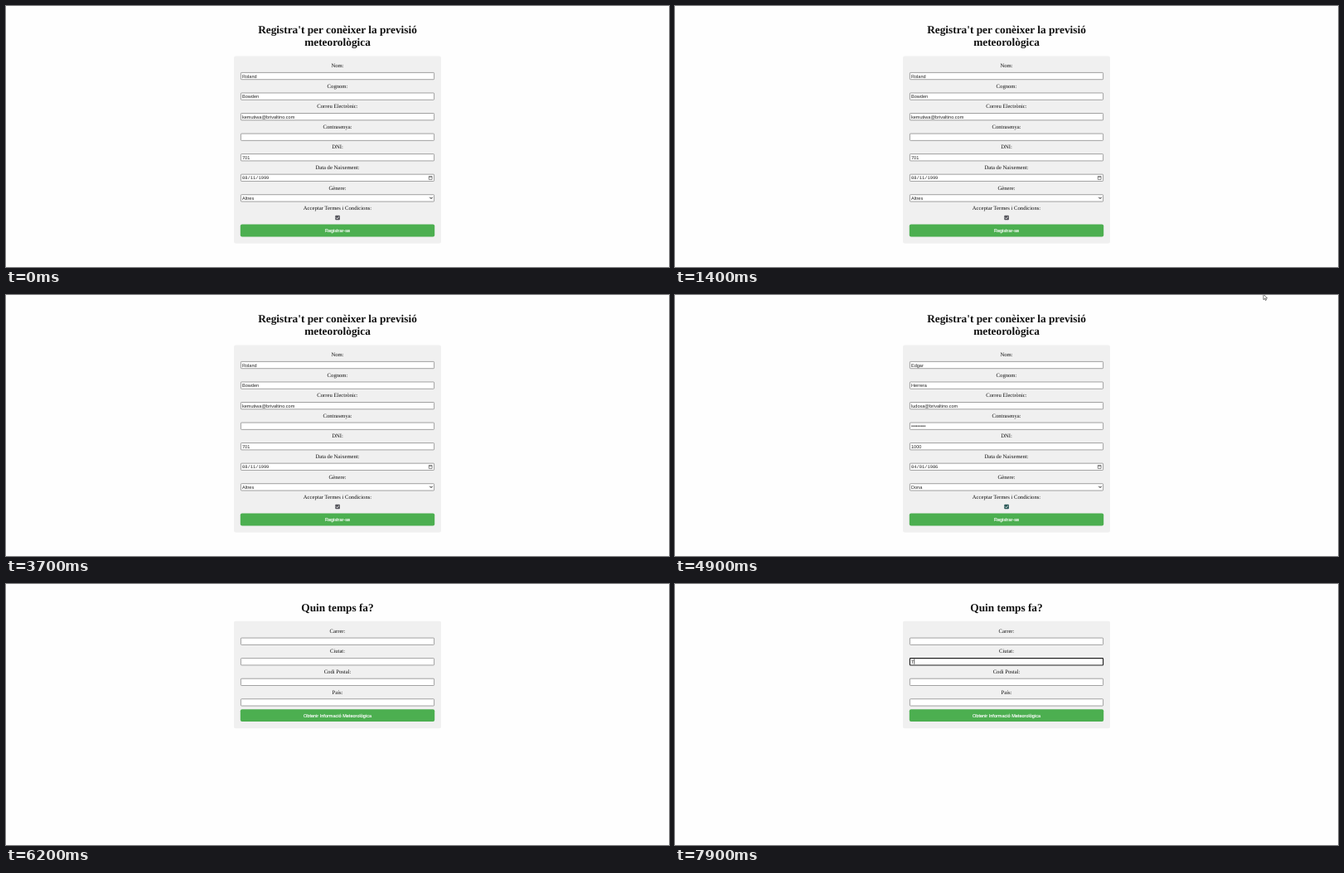
Animation of 800 by 315 pixels, one loop 8 s. Source, as an HTML page:

```html
<!DOCTYPE html>
<html lang="ca">
<head>
<meta charset="utf-8">
<style>
  html, body { margin: 0; width: 100%; height: 100%; overflow: hidden; background: #fefefe; }
  svg { display: block; width: 800px; height: 315px; }
  text { white-space: pre; text-rendering: geometricPrecision; fill: #111; }
  .title { font: bold 13.33px "Liberation Serif", "Times New Roman", serif; text-anchor: middle; }
  .label { font: 6.67px "Liberation Serif", "Times New Roman", serif; text-anchor: middle; }
  .value { font: 5.56px "Liberation Sans", Arial, sans-serif; fill: #222; }
  .date { font-family: "Liberation Mono", monospace; font-size: 5.4px; }
  .submit { fill: #fff; stroke: #fff; stroke-width: .15; text-anchor: middle; }
  .panel { fill: #f0f0f0; }
  .button { fill: #4caf50; }
  .field { fill: #fff; stroke: #858585; stroke-width: .75; }
  .focus { stroke: #222; stroke-width: 1.15; }
  .icon { fill: none; stroke: #333; stroke-width: .55; }
  .chevron { stroke: #111; stroke-width: 1; }
  .pointer { fill: #fff; stroke: #222; stroke-width: .6; stroke-linejoin: round; }
</style>
</head>
<body>
<svg id="stage" viewBox="0 0 800 315"></svg>
<script>
const LOOP = 8000, STEP = 100, PITCH = 24.55;
const FILL_AT = 3900, SUBMIT_AT = 6100;

const text = (cls, x, y, str, id = "") =>
  `<text class="${cls}" x="${x}" y="${y}" id="${id}">${str}</text>`;
const box = (cls, x, y, w, h, r, id = "") =>
  `<rect class="${cls}" x="${x}" y="${y}" width="${w}" height="${h}" rx="${r}" id="${id}"/>`;
const panel = (y, h) => box("panel", 275, y, 250, h, 2);
const button = (y, str) =>
  box("button", 282.8, y, 234.4, 14.8, 2) + text("value submit", 400, y + 9.4, str);

// A centred label with its input below
function row(y, label, id, cls = "") {
  return text("label", 400, y + 2.2, label) +
    box("field", 283.4, y + 8.4, 233.2, 8.3, .8, id + "Box") +
    text("value " + cls, 285, y + 14.6, "", id);
}

function registerPage() {
  const labels = ["Nom:", "Cognom:", "Correu Electrònic:", "Contrasenya:", "DNI:", "Data de Naixement:", "Gènere:"];
  const rows = labels.map((label, i) => row(72 + i * PITCH, label, "reg" + i, i === 5 ? "date" : ""));
  return text("title", 400, 33.1, "Registra't per conèixer la previsió") +
    text("title", 400, 48.4, "meteorològica") +
    panel(60.5, 226) + rows.join("") +
    `<path class="icon" d="M510.3 205.6h3.8v3.8h-3.8zM510.3 206.3h3.8"/>
     <path class="icon chevron" d="M511.3 230.8l1.7 1.7 1.7-1.7"/>` +
    text("label", 400, 246, "Acceptar Termes i Condicions:") +
    box("", 397.3, 252.7, 5.6, 5.6, .8, "check") +
    `<path d="M398.5 255.6l1.2 1.3 2-2.6" fill="none" stroke="#fff" stroke-width=".8"/>` +
    button(263.6, "Registrar-se");
}

function weatherPage() {
  const rows = ["Carrer:", "Ciutat:", "Codi Postal:", "País:"]
    .map((label, i) => row(56.7 + i * PITCH, label, "geo" + i));
  return text("title", 400, 33.1, "Quin temps fa?") +
    panel(44.8, 129.5) + rows.join("") +
    `<path id="caret" stroke="#000" stroke-width=".6"/>` +
    button(151.3, "Obtenir Informació Meteorològica");
}

document.getElementById("stage").innerHTML = `
  <g id="register">${registerPage()}</g>
  <g id="weather">${weatherPage()}</g>
  <path id="arrow" class="pointer" d="M0 0v6.6l1.5-1.3 1 2.2 1.1-.5-1-2.1h2z"/>
  <path id="hand" class="pointer" d="M1.4 .6q.7-.8 1.3 0v2.7l2.7.6q.8.2.7 1l-.5 2.9q-.2.8-1 .8h-2q-.6 0-1-.6l-1.8-2.5q0-.8.8-.6l.8.6z"/>`;

const $ = id => document.getElementById(id);
const show = (el, on) => el.setAttribute("visibility", on ? "visible" : "hidden");

const people = [
  ["Roland", "Bowden", "kemutiwa@brivaltino.com", "", "701", "08/11/1999", "Altres"],
  ["Edgar", "Herrera", "ludoxa@brivaltino.com", "•".repeat(9), "1000", "04/01/1986", "Dona"],
];

// Pointer strokes: [time, x, y]; hidden between strokes
const strokes = [
  [[1500, 405, 262], [1700, 470, 170], [1900, 560, 80], [2100, 622, 12], [2200, 633, -3], [3500, 633, -3], [3600, 638, -5]],
  [[4000, 710, -1], [5000, 710, -1], [5100, 692, 30], [5200, 645, 100], [5300, 565, 190],
   [5400, 482, 262], [5500, 425, 294], [5600, 402, 282], [5700, 392, 269.5], [6100, 392, 269.5]],
];

function pointerAt(t) {
  const path = strokes.find(s => t >= s[0][0] && t <= s[s.length - 1][0]);
  if (!path) return null;
  const i = Math.max(1, path.findIndex(p => p[0] >= t));
  const [t0, x0, y0] = path[i - 1], [t1, x1, y1] = path[i];
  const k = (t - t0) / (t1 - t0);
  return [x0 + (x1 - x0) * k, y0 + (y1 - y0) * k];
}

function render(now) {
  const t = Math.floor(now % LOOP / STEP) * STEP;
  const filled = t >= FILL_AT, submitted = t >= SUBMIT_AT;

  $("register").style.display = submitted ? "none" : "";
  $("weather").style.display = submitted ? "" : "none";
  people[+filled].forEach((value, i) => $("reg" + i).textContent = value);
  $("check").setAttribute("fill", filled ? "#2d5a59" : "#55555c");

  const focus = t < 7000 ? -1 : t < 7200 ? 0 : 1;
  [0, 1].forEach(i => $(`geo${i}Box`).classList.toggle("focus", i === focus));
  const typed = t >= 7900;
  $("geo1").textContent = typed ? "T" : "";
  const y = 65.9 + focus * PITCH;
  $("caret").setAttribute("d", `M${typed ? 288.7 : 285.2} ${y}v6.4`);
  $("caret").style.display = focus >= 0 && (t < 7700 || typed) ? "" : "none";

  const p = pointerAt(t);
  const overButton = p && !submitted && p[0] > 283 && p[0] < 517 && p[1] > 263 && p[1] < 278;
  show($("hand"), p && overButton);
  show($("arrow"), p && !overButton);
  if (p) for (const id of ["arrow", "hand"]) $(id).setAttribute("transform", `translate(${p})`);
}

function tick() {
  render(performance.now());
  requestAnimationFrame(tick);
}
tick();
</script>
</body>
</html>
```
